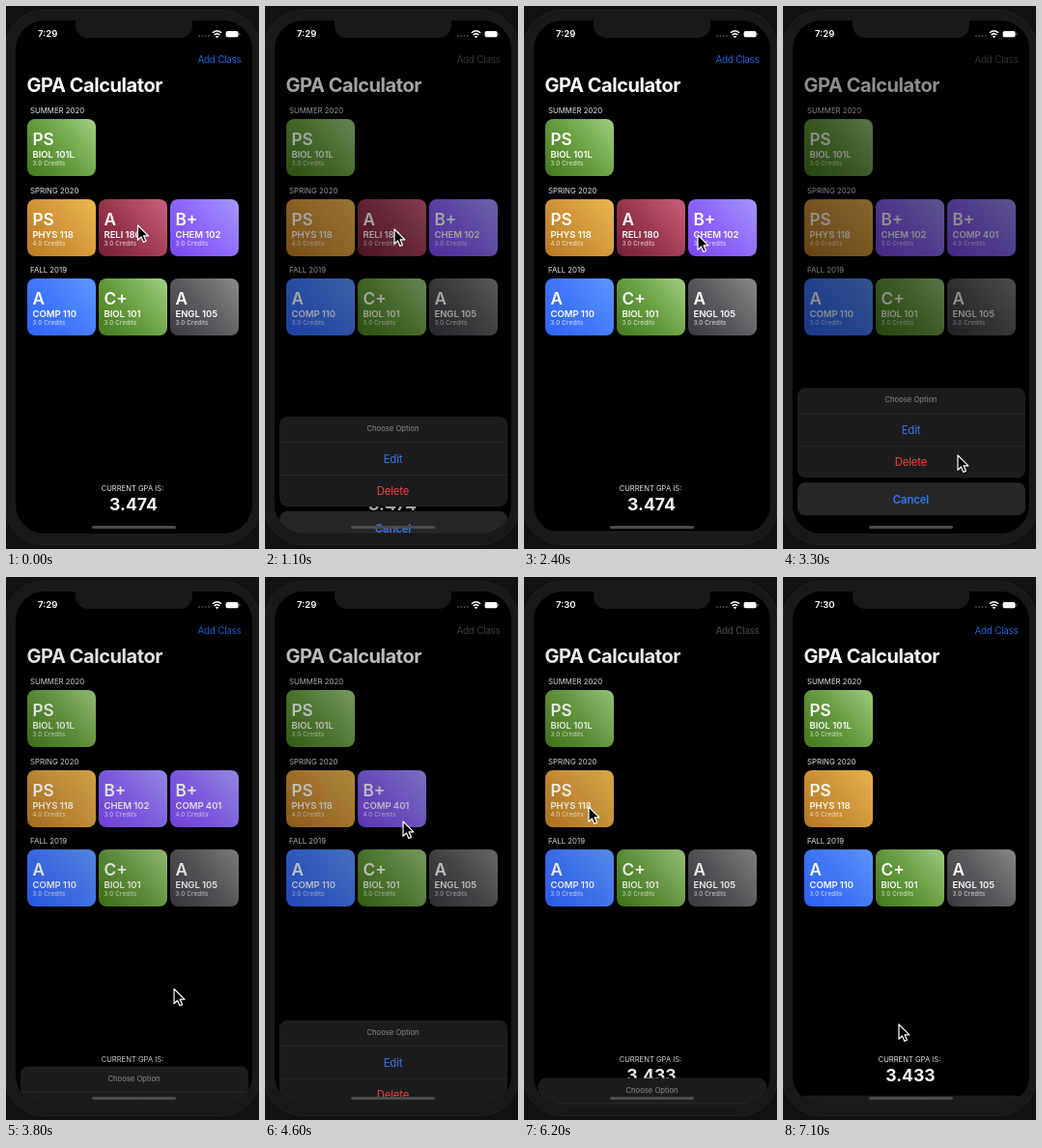
An HTML page for the animation above (7.2 s loop, 262x562 px).

```html
<!DOCTYPE html>
<html lang="en">
<head>
<meta charset="utf-8">
<title>GPA Calculator</title>
<style>
html, body { margin: 0; width: 100%; height: 100%; overflow: hidden; background: #111213; }
body { font-family: Inter, "Open Sans", sans-serif; color: #fff; }
#stage { position: relative; width: 262px; height: 562px; overflow: hidden; }
#stage div, #stage svg { position: absolute; }
.body { left: -1px; top: 4px; width: 262px; height: 552px; border: 1px solid #222; border-radius: 40px; background: #191919; }
.screen { left: 10px; top: 15px; width: 245px; height: 531px; border-radius: 30px; background: #000; overflow: hidden; }
.page { left: -10px; top: -15px; width: 262px; height: 562px; }
.notch { left: 72px; top: 10px; width: 121px; height: 23px; border-radius: 0 0 13px 13px; background: #191919; }
.t { line-height: 20px; white-space: nowrap; }
.mid { left: 0; width: 100%; text-align: center; }
.head { left: 25px; font-size: 7.8px; color: #e6e6e6; }
.row { left: 22px; width: 221px; height: 60px; overflow: hidden; }
.card { width: 71px; height: 59px; border-radius: 8px; }
.card .t { left: 5.5px; }
.grade { top: 11px; font-size: 17.2px; font-weight: 600; }
.name { top: 27px; font-size: 9.5px; font-weight: 600; letter-spacing: -.005em; }
.unit { top: 36px; font-size: 6.1px; letter-spacing: .04em; opacity: .85; }
.green { background: linear-gradient(50deg, #447a1a, #6a9f42 50%, #a2d081); }
.gold { background: linear-gradient(50deg, #b97920, #d4983a 50%, #ebb750); }
.red { background: linear-gradient(50deg, #752136, #9e3a52 50%, #cc6280); }
.violet { background: linear-gradient(50deg, #7c48f4, #8e68fb 50%, #a898ff); }
.blue { background: linear-gradient(50deg, #2d63fa, #437afc 50%, #5c98ff); }
.gray { background: linear-gradient(50deg, #3a3b42, #5c5c60 50%, #8b8b8b); }
.dim { inset: 0; background: #000; }
.sheet { left: 14.5px; top: 394px; width: 236px; height: 133px; }
.group { left: 0; width: 100%; border-radius: 8px; background: #1c1c1d; }
.line { left: 0; width: 100%; height: 1px; background: #2b2b2c; }
.act { font-size: 11.3px; letter-spacing: -.01em; color: #3478f0; }
.bar { left: 88.5px; top: 538px; width: 87.5px; height: 3px; border-radius: 2px; background: #4c4c4e; }
</style>
</head>
<body>
<div id="stage">
  <div class="body"></div>
  <div class="screen"><div class="page">
    <div class="t" id="add" style="right:18.5px;top:45px;font-size:9.9px;letter-spacing:-.025em">Add Class</div>
    <div class="t" style="left:21.5px;top:72px;font-size:20px;font-weight:700;letter-spacing:-.022em">GPA Calculator</div>
    <div id="terms"></div>
    <div class="t mid" style="top:490px;font-size:7.6px;color:#e6e6e6">CURRENT GPA IS:</div>
    <div class="t mid" id="gpa" style="left:1px;top:506px;font-size:17.6px;font-weight:650"></div>
    <div class="dim" id="dim"></div>
    <div class="sheet" id="sheet">
      <div class="group" style="top:0;height:93px">
        <div class="t mid" style="top:3px;font-size:7.7px;color:#8b8b8f">Choose Option</div>
        <div class="line" style="top:26px"></div>
        <div class="t mid act" style="top:33.5px">Edit</div>
        <div class="line" style="top:60px"></div>
        <div class="t mid act" style="top:67px;color:#f0453c">Delete</div>
      </div>
      <div class="group" style="top:98px;height:34px;background:#262628">
        <div class="t mid act" style="top:8px;font-weight:600">Cancel</div>
      </div>
    </div>
    <div class="bar"></div>
  </div></div>
  <div class="notch"></div>
  <div class="t" id="clock" style="left:33px;top:19px;font-size:9.6px;font-weight:600"></div>
  <svg width="262" height="50" style="left:0;top:0">
    <g fill="#454547"><circle cx="200" cy="31" r="1"/><circle cx="203.3" cy="31" r="1"/><circle cx="206.6" cy="31" r="1"/><circle cx="209.9" cy="31" r="1"/></g>
    <g fill="none" stroke="#fff" stroke-width="1.5"><path d="M213.9 27.8Q218.5 23.6 223.1 27.8M215.6 30Q218.5 27.2 221.4 30"/></g>
    <path d="M216.8 31.4Q218.5 30 220.2 31.4L218.5 33.2Z" fill="#fff"/>
    <rect x="227.6" y="26" width="13" height="6.2" rx="1.7" fill="#fff"/>
    <rect x="241.4" y="27.9" width="1" height="2.4" rx=".5" fill="#777"/>
  </svg>
  <svg id="cursor" width="16" height="22" viewBox="-2 -2 16 22" style="left:-2px;top:-2px">
    <path d="M0 0V15.2L3.5 11.9L5.9 17.4L8.5 16.3L6.1 10.9H10.9Z" fill="#000" stroke="#fff" stroke-width="1.2" stroke-linejoin="round"/>
  </svg>
</div>
<script>
const $ = id => document.getElementById(id);
const LOOP = 7200, STEP = 100;

// colour, grade, class, credits, time removed
const terms = [
  ["SUMMER 2020", [["green", "PS", "BIOL 101L", 3]]],
  ["SPRING 2020", [
    ["gold", "PS", "PHYS 118", 4],
    ["red", "A", "RELI 180", 3, 2500],
    ["violet", "B+", "CHEM 102", 3, 4100],
    ["violet", "B+", "COMP 401", 4, 5700]]],
  ["FALL 2019", [
    ["blue", "A", "COMP 110", 3],
    ["green", "C+", "BIOL 101", 3],
    ["gray", "A", "ENGL 105", 3]]]
];
const points = { "A": 4, "B+": 3.3, "C+": 2.3 };
const sheets = [[830, 1850], [2680, 3560], [4425, 5200], [6130, 6690]];
const path = [
  [0, 136.5, 227], [800, 134, 231], [1150, 134, 231], [1500, 150, 466], [1900, 152, 466],
  [2400, 180, 237], [2850, 177, 237], [3250, 181, 465], [3650, 181, 465], [4200, 143, 253],
  [4700, 143, 253], [5000, 146, 464], [5300, 146, 464], [5900, 67, 238], [6300, 67, 238],
  [6650, 120, 463], [7200, 120, 463]
];

function add(parent, cls, text = "") {
  const el = document.createElement("div");
  el.className = cls;
  el.textContent = text;
  return parent.appendChild(el);
}

const rows = terms.map(([title, list], i) => {
  const y = Math.round(117 + i * 82.6);
  add($("terms"), "t head", title).style.top = y - 19 + "px";
  const row = add($("terms"), "row");
  row.style.top = y + "px";
  return list.map(([color, grade, name, credits, end = Infinity]) => {
    const el = add(row, "card " + color);
    add(el, "t grade", grade);
    add(el, "t name", name);
    add(el, "t unit", credits + ".0 Credits");
    return { el, grade, credits, end };
  });
});

// critically damped spring from 0 to 1
function spring(ms) {
  const x = Math.max(0, ms) * 0.011;
  return 1 - (1 + x) * Math.exp(-x);
}

function cursorAt(t) {
  const i = path.findIndex(k => k[0] > t);
  const [t0, x0, y0] = path[i - 1], [t1, x1, y1] = path[i];
  const u = (t - t0) / (t1 - t0), e = u * u * (3 - 2 * u);
  return [x0 + (x1 - x0) * e, y0 + (y1 - y0) * e];
}

function render(t) {
  let sum = 0, total = 0;
  for (const row of rows) {
    let col = 0;
    for (const card of row) {
      const on = t < card.end;
      card.el.style.display = on ? "" : "none";
      if (!on) continue;
      card.el.style.left = 74 * col++ + "px";
      if (card.grade in points) {
        sum += points[card.grade] * card.credits;
        total += card.credits;
      }
    }
  }
  $("gpa").textContent = (sum / total).toFixed(3);
  $("clock").textContent = t < 6000 ? "7:29" : "7:30";

  const [show, hide] = sheets.findLast(s => t >= s[0]) || [LOOP, LOOP];
  const p = spring(t - show) * (1 - spring(t - hide));
  $("sheet").style.transform = `translateY(${152 * (1 - p)}px)`;
  $("sheet").style.visibility = p > 0.01 ? "visible" : "hidden";
  $("dim").style.opacity = 0.45 * p;
  $("add").style.color = t >= show && t < hide ? "#525254" : "#2263dc";

  const [x, y] = cursorAt(t);
  $("cursor").style.transform = `translate(${x}px, ${y}px)`;
}

const start = performance.now();
function tick() {
  const t = (performance.now() - start) % LOOP;
  render(Math.floor(t / STEP) * STEP);
  requestAnimationFrame(tick);
}
tick();
</script>
</body>
</html>
```
